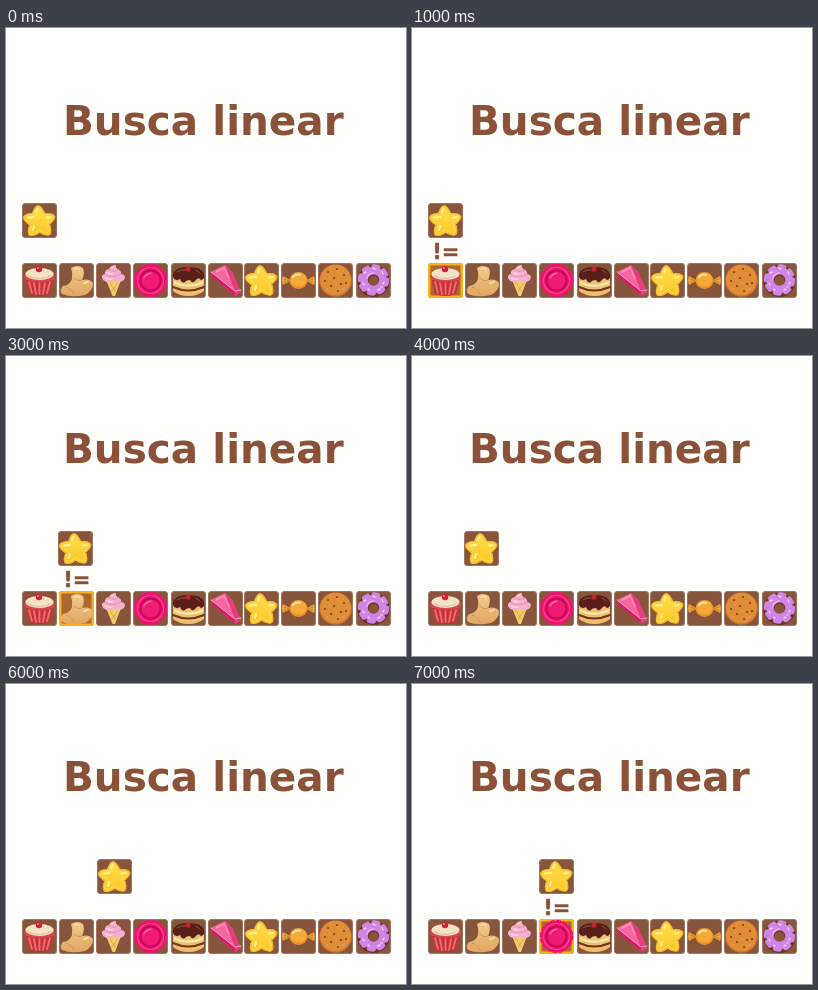
An HTML page that plays this animation: 400 px wide and 300 px high, repeating every 8000 ms.

```html
<!DOCTYPE html>
<html lang="pt">
<head>
<meta charset="utf-8">
<title>Busca linear</title>
<style>
  html, body { margin: 0; width: 100%; height: 100%; overflow: hidden; background: #fefefc; }
  svg { display: block; width: 400px; height: 300px; }
  text { font-family: "DejaVu Sans", Verdana, sans-serif; font-weight: bold; fill: #8b5239; }
  .tile { fill: #87543c; stroke: #a0745e; }
</style>
</head>
<body>
<svg viewBox="0 0 400 300" stroke-linejoin="round" stroke-linecap="round">
  <defs>
    <linearGradient id="gold" x2="0" y2="1">
      <stop offset="0" stop-color="#ffdf4a"/><stop offset="1" stop-color="#fbc829"/>
    </linearGradient>
    <linearGradient id="dough" x2="0" y2="1">
      <stop offset="0" stop-color="#f3cb8b"/><stop offset="1" stop-color="#dfa661"/>
    </linearGradient>
    <rect id="tile" class="tile" x=".5" y=".5" width="34" height="34" rx="2.5"/>

    <g id="cupcake">
      <path d="M3 14H32L28 31Q17.5 35 7 31Z" fill="#c9323a"/>
      <path d="M7 19L10 30M12 20L14 31M17.5 20V31M23 20L21 31M28 19L25 30" stroke="#e8736a" stroke-width="1.8"/>
      <path d="M2 13Q4 6 13 5Q17 2 22 5Q31 6 33 13Q32 19 28 17Q25 20 22 18Q18 21 14 18Q10 20 7 17Q2 18 2 13Z" fill="#d94848"/>
      <ellipse cx="17.5" cy="11" rx="14" ry="6" fill="#f4e3c6"/>
      <path d="M6 13Q17 18 28 13" fill="none" stroke="#dcbd9c"/>
      <circle cx="17" cy="6" r="3.2" fill="#cf2230"/><circle cx="16" cy="5" r=".9" fill="#ff9a98"/>
    </g>
    <g id="croissant">
      <path d="M12 5Q18 1 24 5Q26 11 23 17Q31 15 34 20Q34 28 26 32Q12 35 3 31Q0 27 4 23Q11 22 13 16Q14 10 12 5Z" fill="url(#dough)"/>
      <path d="M15 15Q19 19 23 17M7 24Q12 25 15 31" fill="none" stroke="#cf955a"/>
      <path d="M16 6Q19 4 21 7M25 20L29 19" fill="none" stroke="#fbe0ae" stroke-width="1.5"/>
    </g>
    <g id="icecream">
      <path d="M10 17H25L19 33H16.5Z" fill="#f2cd6b"/>
      <path d="M14 20L19 28M22 20L16 28" stroke="#d59d41" stroke-width=".8"/>
      <path d="M7 17Q4 12 9 11Q8 7 13 6Q15 2 20 2Q19 5 23 7Q26 9 25 11Q31 12 28 17Q23 21 18 18Q12 21 7 17Z" fill="#f6b0cd"/>
      <path d="M9 12Q18 16 25 11M13 7Q18 10 23 7" fill="none" stroke="#e68fb6"/>
      <path d="M9 15Q13 17 16 16M12 10L16 11M16 5L18 4" fill="none" stroke="#fcd9e8" stroke-width="1.3"/>
    </g>
    <g id="jelly">
      <circle cx="17.5" cy="17.5" r="15.5" fill="#f0126c"/>
      <circle cx="17.5" cy="17.5" r="15.5" fill="none" stroke="#f0126c" stroke-width="2.4" stroke-dasharray="3 3.09"/>
      <circle cx="17.5" cy="17.5" r="13" fill="none" stroke="#fb4a93" stroke-width="1.2"/>
      <circle cx="17.5" cy="17.5" r="10" fill="#ee1c72" stroke="#c60857" stroke-width="1.8"/>
      <path d="M11 15Q13 11 18 10" fill="none" stroke="#fb6da6" stroke-width="1.3"/>
    </g>
    <g id="cake">
      <path d="M2 13V28Q8 33 17.5 33Q27 33 33 28V13Z" fill="#efbf6d"/>
      <path d="M3 18Q17 25 32 18V21Q17 27 3 21Z" fill="#fbe7ad"/>
      <path d="M2 24Q17 31 33 24" fill="none" stroke="#713620" stroke-width="2"/>
      <path d="M2 11Q4 4 17.5 4Q31 4 33 11V15Q30 19 28 15Q25 16 24 18Q21 21 19 17Q15 17 14 19Q11 21 9 16Q4 19 2 14Z" fill="#5a1f1a"/>
      <path d="M6 9Q10 6 14 7M25 7L29 10" fill="none" stroke="#96504a"/>
      <path d="M18 4L21 1" stroke="#5c7a2b" stroke-width=".8"/>
      <circle cx="17" cy="6" r="2.6" fill="#c9202e"/>
    </g>
    <g id="slice">
      <path d="M3 9L17 2L24 9L33 29L27 33Z" fill="#f2689f"/>
      <path d="M3 9L27 28V33L4 14Z" fill="#d51f67"/>
      <path d="M17 2L24 9L33 29L27 33V28Z" fill="#e83a7d"/>
      <path d="M3 9L27 28L33 27" fill="none" stroke="#fba7c8"/>
      <path d="M8 9L16 5L21 15" fill="none" stroke="#f991bb" stroke-width="1.4"/>
    </g>
    <g id="star">
      <path id="starShape" d="M16 4.5Q18 4.500 21.500 12Q30 12 31 14Q31 16 25.500 20.500Q28 28 26.500 30Q24 31 17.500 27Q11 32 8.500 30.500Q7 29 10 21Q3 17 3.500 14.500Q5 12 12 12Q14 5 16 4.500Z" fill="#f4b82f" stroke="#f4b82f" stroke-width="4.6"/>
      <use href="#starShape"/>
      <path d="M16 4.5Q18 4.500 21.500 12Q30 12 31 14Q31 16 25.500 20.500Q28 28 26.500 30Q24 31 17.500 27Q11 32 8.500 30.500Q7 29 10 21Q3 17 3.500 14.500Q5 12 12 12Q14 5 16 4.500Z" fill="url(#gold)" stroke="#fdd643" stroke-width="2"/>
      <path d="M14 9L15.500 5.500M6 14.500L12 14M25 14.500L29 14M11 27L12 23" stroke="#fff2a0" stroke-width="2"/>
    </g>
    <g id="candy">
      <path d="M10 17.5L2 13Q0 17 2 22ZM25 17.5L33 13Q35 17 33 22Z" fill="#eda139"/>
      <path d="M3 16L8 17.500L3 19.500M32 16L27 17.500L32 19.500" fill="none" stroke="#c97a22" stroke-width=".8"/>
      <ellipse cx="17.5" cy="17.5" rx="9" ry="8.5" fill="#e9932a"/>
      <ellipse cx="17.5" cy="16.500" rx="8" ry="7" fill="#f5aa38"/>
      <path d="M12 14Q15 10.500 19 12" fill="none" stroke="#ffe2a0" stroke-width="2"/>
    </g>
    <g id="cookie">
      <circle cx="17.5" cy="17.5" r="16.3" fill="#c9742a"/>
      <circle cx="17.5" cy="17" r="15.3" fill="#e08d37"/>
      <path d="M10 9h.1M19 6h.1M26 12h.1M16 15h.1M7 18h.1M23 21h.1M13 23h.1M28 20h.1M20 28h.1" stroke="#8a451c" stroke-width="2.1"/>
      <path d="M13 5h.1M22 11h.1M11 14h.1M18 20h.1M9 26h.1M26 26h.1" stroke="#efaa59" stroke-width="1.5"/>
    </g>
    <g id="donut">
      <circle cx="17.5" cy="18" r="10.5" fill="none" stroke="#6c341f" stroke-width="11"/>
      <circle cx="17.5" cy="17" r="9.5" fill="none" stroke="#cf84e6" stroke-width="7.5"/>
      <circle cx="17.5" cy="17" r="13.2" fill="none" stroke="#cf84e6" stroke-width="5" stroke-dasharray="4 6.37"/>
      <path d="M11 15Q13 10 18 10" fill="none" stroke="#e6b3f4" stroke-width="1.500"/>
      <path d="M8 10l2-1M17 5l2 1M26 9l1 2M28 19l-1 2M22 27l2-1M13 27l-1-1M7 20l1 2M25 24h1" stroke="#f3d5f8" stroke-width="1.4"/>
    </g>
  </defs>

  <rect width="400" height="300" fill="#fefefc"/>
  <text x="57" y="107" font-size="40.5">Busca linear</text>
  <g id="row"></g>
  <g id="key"><use href="#tile"/><use href="#star"/></g>
  <text id="sign" font-size="21" y="231" stroke="#8b5239" stroke-width=".4">!=</text>
</svg>
<script>
  const sweets = ["cupcake", "croissant", "icecream", "jelly", "cake", "slice", "star", "candy", "cookie", "donut"];
  const slots = [16, 53, 90, 127, 165, 202, 238, 275, 312, 350];
  const keyX = [16, 52, 91, 127];
  // One second per step: [position, comparing]
  const steps = [[0, 0], [0, 1], [0, 0], [1, 1], [1, 0], [2, 1], [2, 0], [3, 1]];
  const $ = id => document.getElementById(id);

  $("row").innerHTML = sweets.map((name, i) => `
    <g transform="translate(${slots[i]} 235)">
      <use href="#tile"/>
      <rect class="mark" x="1.25" y="1.25" width="32.5" height="32.5" rx="1.5"
        fill="#a9692f" stroke="#fbb01e" stroke-width="2.5" visibility="hidden"/>
      <use href="#${name}"/>
    </g>`).join("");
  const marks = document.querySelectorAll(".mark");

  function show(time) {
    const [pos, comparing] = steps[Math.floor(time / 1000) % steps.length];
    $("key").setAttribute("transform", `translate(${keyX[pos]} 175)`);
    $("sign").setAttribute("x", slots[pos] + 4.3);
    $("sign").setAttribute("visibility", comparing ? "visible" : "hidden");
    marks.forEach((mark, i) =>
      mark.setAttribute("visibility", comparing && i === pos ? "visible" : "hidden"));
  }

  const start = performance.now();
  function tick() {
    show(performance.now() - start);
    requestAnimationFrame(tick);
  }
  tick();
</script>
</body>
</html>
```
